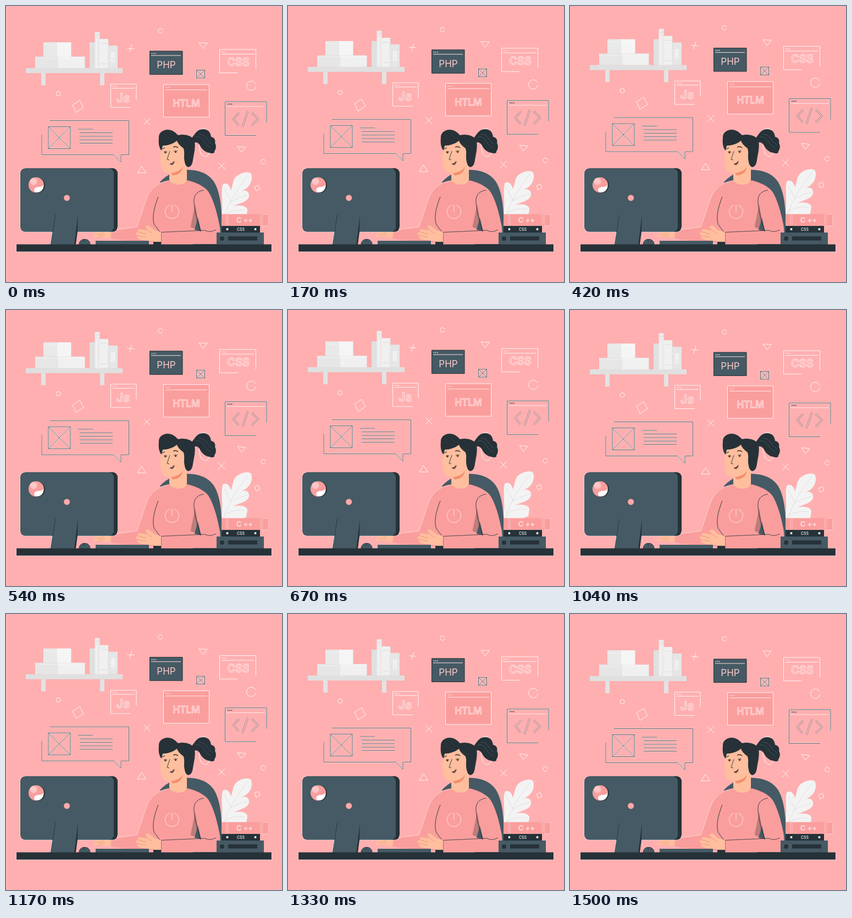
Write an HTML page with a canvas that moves like this. It is 502 px wide and 502 px high and loops after 1540 ms.

```html
<!DOCTYPE html>
<html lang="en">
<head>
<meta charset="utf-8">
<title>Developer at a desk</title>
<style>
html, body { margin: 0; width: 100%; height: 100%; overflow: hidden; background: #ffafb0; }
canvas { display: block; }
</style>
</head>
<body>
<canvas id="stage" width="502" height="502"></canvas>
<script>
const ctx = document.getElementById('stage').getContext('2d');
const LOOP = 1540, FRAMES = 37, STEP = LOOP / FRAMES, RISE = 10;
const BG = '#ffafb0', ROSE = '#fa9e9d', SLATE = '#455a64', INK = '#263238',
      SKIN = '#ffbe9d', WHITE = '#fff', PALE = 'rgba(255,255,255,.85)', FRINGE = 'rgba(255,255,255,.6)';

function rect(x, y, w, h, fill) {
  ctx.fillStyle = fill;
  ctx.fillRect(x, y, w, h);
}

function shape(d, fill, stroke, width = 1) {
  const path = new Path2D(d);
  if (fill) { ctx.fillStyle = fill; ctx.fill(path); }
  if (stroke) { ctx.strokeStyle = stroke; ctx.lineWidth = width; ctx.stroke(path); }
}

const line = (d, color = PALE, width = 1) => shape(d, null, color, width);

function disc(x, y, r, fill, stroke, width = 1, from = 0, to = Math.PI * 2) {
  ctx.beginPath();
  ctx.arc(x, y, r, from, to);
  if (fill) { ctx.fillStyle = fill; ctx.fill(); }
  if (stroke) { ctx.strokeStyle = stroke; ctx.lineWidth = width; ctx.stroke(); }
}

function rounded(x, y, w, h, r, fill) {
  ctx.beginPath();
  ctx.roundRect(x, y, w, h, r);
  ctx.fillStyle = fill;
  ctx.fill();
}

// Dark hairline with a faint light fringe.
function inked(d) {
  line(d, FRINGE, 2);
  line(d, SLATE, 0.9);
}

function label(text, x, y, size, weight, fill, stroke) {
  ctx.font = `${weight} ${size}px Inter, "Open Sans", sans-serif`;
  ctx.textAlign = 'center';
  if (fill) { ctx.fillStyle = fill; ctx.fillText(text, x, y); }
  if (stroke) { ctx.strokeStyle = stroke; ctx.lineWidth = 0.8; ctx.strokeText(text, x, y); }
}

function titleBar(x, y, w, gap, color) {
  line(`M${x + 3} ${y + gap}H${x + w - 3}`, color);
  for (let i = 0; i < 3; i++) disc(x + 4.5 + i * 3.2, y + gap / 2 + 0.3, 0.9, color);
}

// Window frame left open around its lower right corner.
const openFrame = (x, y, w, h, right, bottom) =>
  `M${x + w} ${y + h * right}V${y}H${x}V${y + h}H${x + w * bottom}`;

function drawShelf() {
  rect(64, 122, 8, 22, '#e3e3e3');
  rect(171, 122, 8, 22, '#e3e3e3');
  rect(36, 113, 176, 9, '#e0e0e0');
  rect(53, 92, 42, 21, '#e6e6e6');
  rect(95, 92, 48.5, 21, '#f0f0f0');
  rect(68, 66, 26, 26, '#e9e9e9');
  rect(93, 66, 25.5, 26, '#f5f5f5');
  line('M53 95H143.5M68 71H118.5', 'rgba(255,255,255,.4)');
  rect(152, 66, 10, 47, '#e0e0e0');
  rect(161.5, 47, 9, 66, '#ebebeb');
  rect(163, 60, 23, 53, '#f0f0f0');
  rect(186, 72, 17, 41, '#e6e6e6');
  line('M163 53H170M168.5 60V113M172 68H184M172 105H184M186 60V113', '#dcdcdc');
  ctx.save();
  ctx.translate(198, 93);
  ctx.rotate(-Math.PI / 2);
  label('CSS', 0, 0, 9, 700, null, '#f7f7f7');
  ctx.restore();
}

function drawWindows() {
  rect(261.5, 82, 59.5, 42.5, SLATE);
  line('M261.5 82H321V124.5H261.5Z', INK);
  titleBar(261, 82, 60, 8, '#ffe0e0');
  label('PHP', 291.5, 113, 17, 400, '#ffcaca');

  line(openFrame(388.5, 79, 66, 42.5, 0.85, 0.5));
  titleBar(388.5, 79, 66, 8.5, PALE);
  label('CSS', 422.5, 109, 20, 600, null, PALE);

  line(openFrame(190.5, 142, 46.5, 42.5, 0.65, 0.78));
  titleBar(190.5, 142, 46.5, 7.5, PALE);
  label('Js', 213, 174.5, 22, 600, null, PALE);

  shape('M286.5 143H369.5V202H286.5Z', ROSE, PALE);
  titleBar(287, 143, 82, 9.5, '#ffe6e6');
  label('HTLM', 328, 183, 17, 600, BG, '#ffe6e6');

  inked(openFrame(398.5, 174, 75.5, 61.5, 0.62, 0.75));
  titleBar(398.5, 174, 75.5, 8.8, 'rgba(255,255,255,.7)');
  for (let i = 0; i < 3; i++) disc(404 + i * 3.2, 178.5, 1, INK);
  const code = 'M424 194L413.5 205.5L423 217M440 191L430 220M447 194L458.5 205.5L447 217';
  line(code, '#8b7d84', 3);
  line(code, '#ffc4c5', 1.6);
}

function drawBubble() {
  inked('M80 208.5H223.5V270.5H209V284L196 270.5H65V234');
  inked('M77 219.5H117V259.5H77ZL117 259.5M117 219.5L77 259.5');
  inked('M131 224H158M134 230.5H194M134 237H194M134 243.3H194M134 249.5H194');
  inked('M346.5 116.5H361.5V131H346.5ZL361.5 131M361.5 116.5L346.5 131');
}

function drawConfetti() {
  line('M220 77L233.5 78M229 70L224.5 84.5');
  line('M250 204L262 216.5M262.5 204L250 216.5');
  line('M386 284.5L398.5 297M398 284L386 297');
  disc(281, 45, 4, null, PALE, 1, 0.3, 6);
  disc(95, 159.5, 4, null, PALE);
  disc(446, 145, 8.5, null, PALE, 1, 0.1, 5.9);
  disc(468, 283, 4.2, null, PALE, 1, 0.5, 6.2);
  line('M351 67L366 67.5L358.5 77.5Z');
  line('M421 255.5L436 257L428 266Z');
  line('M246.5 291.5L254.5 303.5L239 303.5Z');
  line('M121 180L134 171.5L141 184.5L127.5 193.5Z');
  line('M452 329L459 326L462 333L455 336.5Z');
}

function drawPlant() {
  shape(`M390 400L393 372C394 356 391 338 394 325C400 320 407 325 409 335
    C413 326 412 315 420 309C429 302 440 301 445 304C449 310 447 322 441 328
    Q436 334 428 336C437 334 443 338 442 346C440 356 427 358 413 364
    C425 361 440 364 439 372L437 384L396 400Z`, '#f3f3f3');
  line('M394 390Q406 350 440 308M409 355L397 332M407 357Q422 348 439 344M399 378Q415 369 434 372',
    '#dedede', 0.9);
}

function drawMonitor() {
  rounded(40, 295, 163, 116, 9, INK);
  rounded(26, 295, 170, 116, 9, SLATE);
  shape('M89.5 379H131L124.5 434H80.5Z', SLATE);
  shape('M131 380L124 434H127L130 411Z', INK);
  line('M89.5 380L85 411', INK, 0.8);
  line('M84 411L80.5 433M130 411H194Q202.5 411 203 402', FRINGE, 0.8);
  line('M84 411H35Q25.5 411 25.5 402V304Q25.5 294.7 35 294.7', FRINGE, 0.8);
  disc(110.7, 349, 5.5, '#ffa9a9');
  disc(57, 326, 14, INK);
  disc(55, 325.5, 14, ROSE);
  disc(50, 319, 6.5, '#ffc6c5');
  shape('M51 334C55 326 61 332 68 326C69 336 60 341 52 338Z', WHITE);
}

function drawChair() {
  shape('M280 320C294 305 312 298 328 298C352 298 369 305 379 321C391 341 394 376 393 434H340Z', SLATE);
}

function drawBody() {
  shape('M297 292L329 286V318C325 328 303 328 297 318Z', SKIN);
  shape('M158 417Q166 409 178 406L197 405L194 421Q184 425 177 419L161 421Z', SKIN);
  line('M162 417L178 412M167 420L180 415', '#e79478', 0.7);
  shape(`M297 317C277 320 264 330 257 347C249 368 243 390 238 402
    L192 408L190 422C205 426 230 428 250 428L282 433H383
    C390 424 391 411 388 397C383 371 375 346 366 335C356 325 343 320 330 317
    C324 328 304 328 297 317Z`, ROSE);
  shape('M344 360Q340 381 335.5 402L355 410Q349 390 344 360Z', '#bd7d7c');
  shape('M349 385L343 407L355 410Z', SLATE);
  line('M277 347C269 367 265 386 270 398L280 411M360 335C345 337 341 347 342 358C344 376 348 393 354 409',
    INK, 0.9);
  line('M282 411.5L362 408Q370 413 382 407M282 411V433', INK, 0.8);
  line('M296 318C278 321 264 331 257 347C249 368 243 390 238 402L198 407', FRINGE, 0.8);
  shape(`M282 411L270 408L259 399C254 399 252 402 256 405L260 409
    L245 406Q236 406 241 411L237 412Q233 415 241 418L238 420Q240 425 250 426L282 429Z`, SKIN);
  line('M241 411L255 415M241 418L254 420M260 409L266 413', '#e08f73', 0.8);
  disc(302, 374, 12.5, null, '#ffe0df', 1, -1.2, 4.34);
  line('M302 361V375', '#ffe0df');
}

function drawHead() {
  line('M352 249C350 262 355 273 362 274C367 273 370 269 368 264');
  line('M342 235C350 222 360 221 367 226');
  shape(`M338 240C344 233 347 224 358 224C368 224 372 230 373 238
    C378 239 382 243 380 249C383 254 382 261 379 264C380 268 375 269 370 267
    C362 266 356 260 353 254C350 248 345 247 339 249Z`, INK);
  line('M345 238C360 236 358 251 373 258M351 233C366 234 364 246 376 252', SLATE, 0.8);

  shape(`M284 252C281 266 279 281 283 294C286 302 293 305 301 304
    C315 303 329 293 330 278L327 243H290Z`, SKIN);
  shape('M300 304Q315 302 322 293Q318 308 303 308Z', '#f28f6d');
  shape(`M283 263C278 258 277 248 278 240C277 232 284 225 294 225
    C303 225 309 231 313 235C326 232 340 237 343 245C345 258 342 268 340 280
    C339 288 336 293 331 293C326 291 325 285 324 277C324 268 325 262 322 258
    C317 255 312 249 311 245C304 251 293 254 285 254Z`, INK);

  disc(290, 266.5, 1.6, INK);
  disc(308.5, 265.5, 1.6, INK);
  line('M284 260L289 258M304 257Q309 254 313 258', INK, 1.3);
  line('M287 265.5Q290 263 293 265.5M305 264.5Q308 262 312 264', INK, 0.8);
  line('M298 264L293 279L297 280', INK, 0.9);
  shape('M298 287Q303 287 306 282Q306 288 301 289Z', '#74403c', INK, 0.6);
}

function drawDesk() {
  shape('M133 434C133 421 153 421 153 434Z', SLATE, INK);
  line('M142 425V430', INK);
  rect(163, 427, 97, 7, SLATE);
  rect(268, 429, 14, 5, INK);

  shape('M392 378.5H477.5V400H392Z', ROSE);
  line('M401 379V400M404 379V400M463 379V400M466 379V400', '#ffc9c8', 0.8);
  line('M466 379H477.5V400H466', '#ffd0cf', 0.8);
  label('C ++', 434, 393.5, 13, 700, '#ffdcdb');
  rect(392, 400, 70, 12.5, INK);
  label('CSS', 427, 408.7, 7, 500, WHITE);
  disc(402.5, 406, 2, WHITE);
  disc(453.5, 406, 2, WHITE);
  rect(383, 412, 86, 22, SLATE);
  rect(404, 419, 53, 7.5, INK);
  disc(393, 423, 4, INK);

  rect(19, 433.5, 464, 13.3, INK);
  line('M18.6 433V447.2H483.4V433', FRINGE, 0.8);
}

// The objects on the wall rise and sink at an even pace, slightly out of step with the loop.
function liftAt(frame) {
  const height = Math.abs(1 - Math.abs(frame - 17) / 18);
  return RISE * (height - 1 / 18);
}

function render(time) {
  const frame = Math.floor((time % LOOP + 5) / STEP) % FRAMES;
  rect(0, 0, 502, 502, BG);
  ctx.lineJoin = 'round';
  ctx.save();
  ctx.translate(0, -liftAt(frame));
  [drawShelf, drawWindows, drawBubble, drawConfetti, drawPlant].forEach(draw => draw());
  ctx.restore();
  [drawChair, drawBody, drawHead, drawMonitor, drawDesk].forEach(draw => draw());
}

const start = performance.now();
function tick() {
  render(performance.now() - start);
  requestAnimationFrame(tick);
}
tick();
</script>
</body>
</html>
```
